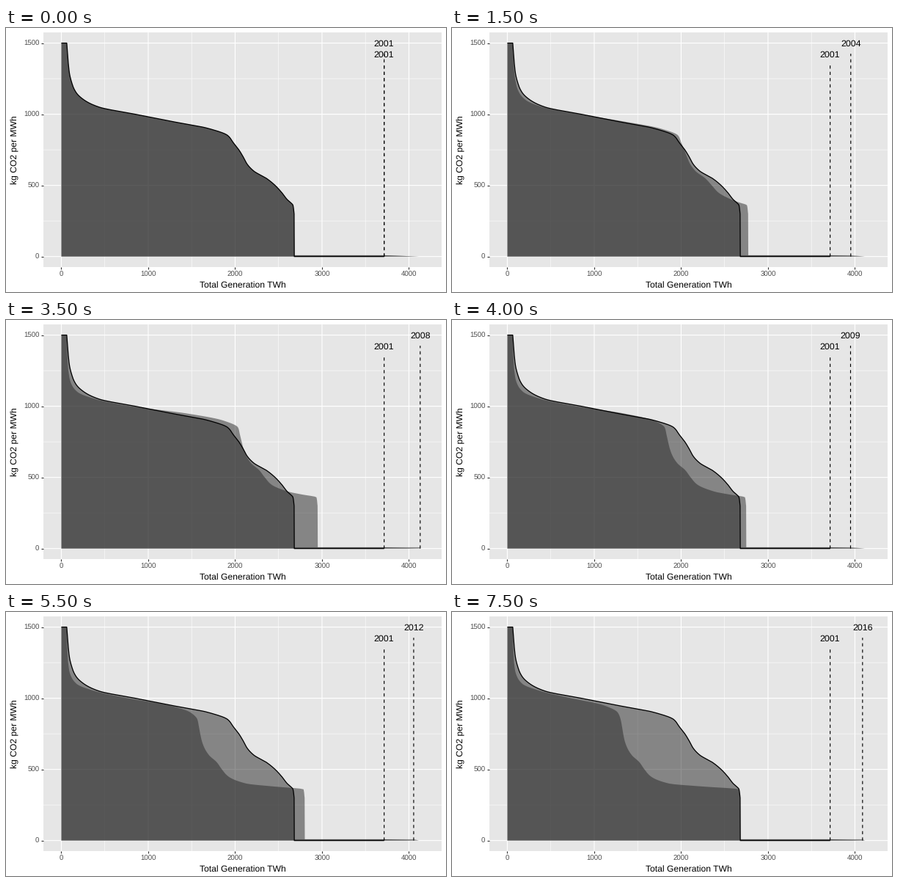
A matplotlib script that plays this animation: 600 by 360 pixels, repeating every 8 s.

```python
import numpy as np
import matplotlib.pyplot as plt
from matplotlib.animation import FuncAnimation

W, H, DPI = 600, 360, 100
PX = 72 / DPI  # points per pixel
LEFT, RIGHT, TOP, BOTTOM = 50.8, 594, 6, 326.2
FIRST, LAST = 2001, 2016
CAP, TAIL, WEDGE_END, X_MAX = 1500, 9, 4115, 4168

# Turning points in TWh; years between them are interpolated.
TOTAL = {2001: 3715, 2002: 3845, 2003: 3847, 2005: 4058, 2006: 4075,
         2007: 4168, 2008: 4130, 2009: 3950, 2010: 4132, 2012: 4055,
         2014: 4097, 2016: 4088}
COAL = {2001: 1916, 2008: 2034, 2009: 1812, 2010: 1903, 2012: 1566,
        2014: 1616, 2016: 1304}
FOSSIL = {2001: 2681, 2004: 2773, 2007: 3005, 2008: 2951, 2009: 2750,
          2010: 2907, 2012: 2802, 2014: 2775, 2016: 2679}

# Emission level: (early, late) position of the curve.
HEAD = {1500: (62, 62), 1300: (90, 71), 1200: (131, 87), 1150: (173, 112),
        1100: (262, 174), 1050: (435, 385)}           # from zero
KNEE = {850: (0, 0), 800: (63, 15), 750: (127, 28), 700: (177, 45),
        650: (222, 75), 600: (300, 126), 550: (443, 213), 500: (544, 270),
        450: (620, 345), 400: (684, 560)}             # past the coal edge


def at(points, year):
    return np.interp(year, list(points), list(points.values()))


def lerp(a, b, t):
    return a + (b - a) * t


def smooth(x, y, xs):
    """Monotone cubic interpolation through ascending x."""
    h = np.diff(x)
    d = np.diff(y) / h
    m = np.concatenate([[d[0]], 2 * d[:-1] * d[1:] / (d[:-1] + d[1:]), [d[-1]]])
    i = np.clip(np.searchsorted(x, xs, side="right") - 1, 0, len(h) - 1)
    t = (xs - x[i]) / h[i]
    return (y[i] * (1 + 2 * t) * (1 - t) ** 2 + h[i] * m[i] * t * (1 - t) ** 2
            + y[i + 1] * t * t * (3 - 2 * t) + h[i] * m[i + 1] * t * t * (t - 1))


def curve(year):
    """Emission rate against cumulative generation, dirtiest first."""
    drift = (year - FIRST) / (LAST - FIRST)
    settled = 1 - np.exp((FIRST - year) / 3.5)
    coal, fossil = at(COAL, year), at(FOSSIL, year)

    knots = {level: lerp(*ends, settled) for level, ends in HEAD.items()}
    slope = lerp(850, 735, drift)
    knots[1000] = slope
    knots[950] = lerp(slope, coal, lerp(0.39, 0.66, drift))
    knots[900] = lerp(slope, coal, lerp(0.79, 0.94, drift))
    knots.update({level: coal + lerp(*ends, settled)
                  for level, ends in KNEE.items()})
    knots[380] = lerp(knots[400], fossil, 0.46)
    knots[360] = fossil - 15
    knots[300] = fossil - 2

    levels = np.array(list(knots), float)[::-1]
    places = np.array(list(knots.values()))[::-1]
    level = np.linspace(CAP, levels[0], 241)
    x = smooth(levels, places, level)
    return np.vstack([[0, CAP], np.column_stack([x, level])])


def area(year):
    total, fossil = at(TOTAL, year), at(FOSSIL, year)
    return np.vstack([[0, 0], curve(year), [fossil, TAIL], [total, TAIL],
                      [max(total, WEDGE_END), 0]])


plt.rcParams["font.family"] = "Liberation Sans"
plt.rcParams["text.hinting"] = "none"
fig = plt.figure(figsize=(W / DPI, H / DPI), dpi=DPI, facecolor="white")
ax = fig.add_axes([LEFT / W, 1 - BOTTOM / H,
                   (RIGHT - LEFT) / W, (BOTTOM - TOP) / H])
ax.set_facecolor("#E6E6E6")
ax.set_xlim(-0.05 * X_MAX, 1.05 * X_MAX)
ax.set_ylim(-0.05 * CAP, 1.05 * CAP)
ax.set_xticks(range(0, 4001, 1000))
ax.set_yticks(range(0, 1501, 500))
ax.tick_params(length=3 * PX, width=1.16 * PX, pad=2.4 * PX, color="#333333",
               labelcolor="#4D4D4D", labelsize=9.6 * PX)
for spine in ax.spines.values():
    spine.set_visible(False)


def grid(xs, ys, width):
    style = dict(color="white", lw=width * PX, zorder=0, snap=False)
    for x in xs:
        ax.axvline(x, **style)
    for y in ys:
        ax.axhline(y, **style)


grid(range(500, 4000, 1000), range(250, 1500, 500), 0.58)
grid(range(0, 4001, 1000), range(0, 1501, 500), 1.16)

title = dict(size=12.1 * PX, ha="center", va="baseline")
fig.text((LEFT + RIGHT) / 2 / W, 1 - 354 / H, "Total Generation TWh", **title)
fig.text(15.6 / W, 1 - (TOP + BOTTOM) / 2 / H, "kg CO2 per MWh",
         rotation=90, rotation_mode="anchor", **title)


def fill(year):
    return ax.fill(*area(year).T, color="#262626", alpha=0.5, lw=0, zorder=2)[0]


def marker(year, y):
    """Dashed line at a year's total with its label on top."""
    x = at(TOTAL, year)
    width = 1.15
    dash = 4.27 / width
    line, = ax.plot([x, x], [0, y - 75], color="black", lw=width * PX,
                    ls=(0, (dash, dash)), zorder=4, snap=False)
    label = ax.text(x, y, str(year), size=12.4 * PX, ha="center",
                    va="center_baseline", zorder=5)
    return line, label


fill(FIRST)
current = fill(FIRST)
outline = np.vstack([curve(FIRST), [FOSSIL[FIRST], 0], [TOTAL[FIRST], 0]])
ax.plot(*outline.T, color="black", lw=1.3 * PX, zorder=3,
        solid_capstyle="butt", snap=False)
marker(FIRST, 1425)
line, label = marker(FIRST, CAP)


def update(k):
    year = FIRST + k
    x = at(TOTAL, year)
    current.set_xy(area(year))
    line.set_xdata([x, x])
    label.set_x(x)
    label.set_text(str(year))
    return current, line, label


anim = FuncAnimation(fig, update, frames=LAST - FIRST + 1, interval=500,
                     repeat=True, repeat_delay=0)
plt.show()
```
